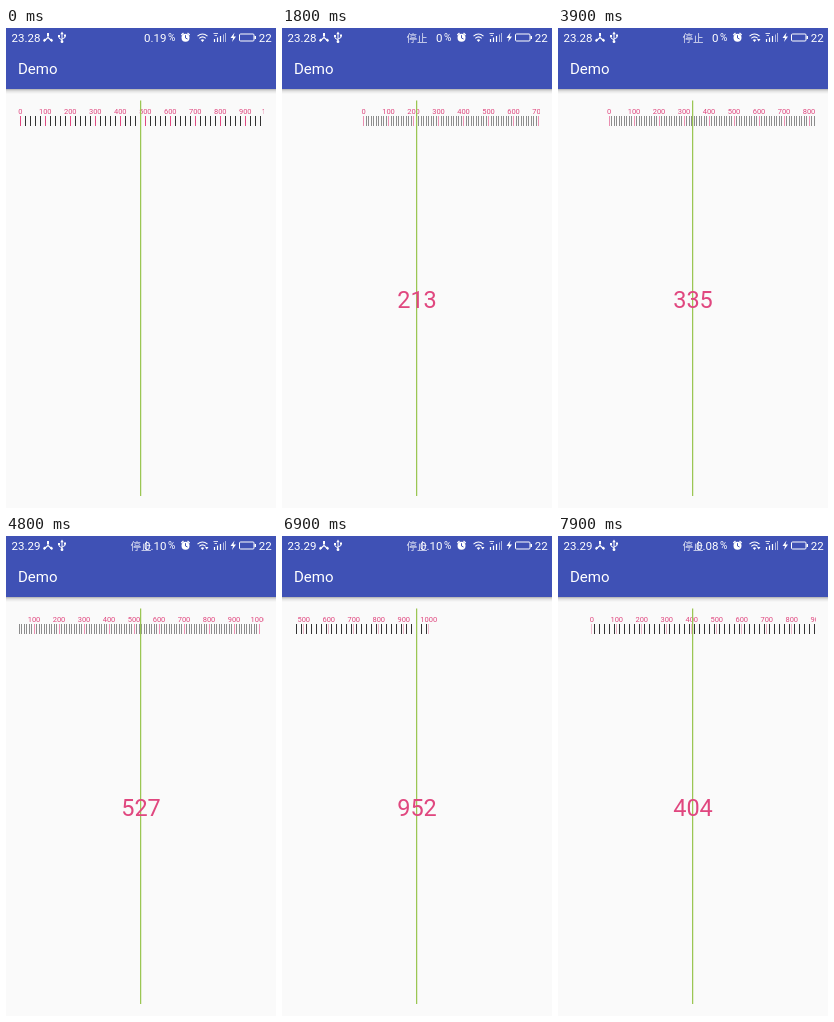
Recreate the animation shown at these times as an HTML page. Size 270 by 480 pixels, loop 8000 ms.

```html
<!DOCTYPE html>
<html lang="en">
<head>
<meta charset="utf-8">
<title>Demo</title>
<style>
  html, body { margin: 0; width: 100%; height: 100%; overflow: hidden; background: #fafafa; }
  svg { display: block; width: 270px; height: 480px; font-family: Roboto, "Noto Sans CJK SC", "Noto Sans CJK", sans-serif; }
  .bar { fill: #fff; font-size: 11.5px; }
  .icon { fill: none; stroke: #fff; }
  .solid { fill: #fff; stroke: none; }
  .pink { fill: #e0477f; text-anchor: middle; }
</style>
</head>
<body>
<svg viewBox="0 0 270 480">
  <defs>
    <linearGradient id="shade" x2="0" y2="1">
      <stop stop-color="#000" stop-opacity=".3"/>
      <stop offset=".4" stop-color="#000" stop-opacity=".1"/>
      <stop offset="1" stop-color="#000" stop-opacity="0"/>
    </linearGradient>
    <clipPath id="view"><rect x="12" y="72" width="246" height="396"/></clipPath>
  </defs>
  <rect width="270" height="480" fill="#fafafa"/>
  <rect y="61" width="270" height="5" fill="url(#shade)"/>
  <rect width="270" height="61" fill="#3f51b5"/>

  <g class="bar">
    <text id="clock" x="5.5" y="13.5"></text>
    <text id="halt" x="124.5" y="13.5" font-size="10.5" opacity=".85">停止</text>
    <text id="speed" x="160.5" y="13.5" text-anchor="end"></text>
    <text x="162" y="13" font-size="10">%</text>
    <text x="252.7" y="13.5">22</text>
    <text x="12" y="45.5" font-size="15">Demo</text>
  </g>

  <g class="icon">
    <path d="M42 5.5V9.5L38 13M42 9.5L46 13" stroke-width="1.1"/>
    <path class="solid" d="M41 5h2v3h-2zM37 12l2-1.5 1 2-2 1.5zM47 12l-2-1.5-1 2 2 1.5z"/>
    <path d="M56 5V14M53 8V10L56 12M59 7.500V9.500L56 11" stroke-width="1"/>
    <path class="solid" d="M56 3.500L57.700 6.300H54.300zM52 7h2v2h-2zM58 6.500h2v2h-2z"/>
    <circle class="solid" cx="56" cy="13.700" r="1.400"/>
    <circle class="solid" cx="179.500" cy="9.700" r="4"/>
    <path d="M175.300 7L177.500 5M183.700 7L181.500 5" stroke-width="1.200"/>
    <path d="M179.500 7.200V10L181.500 11" stroke="#3f51b5"/>
    <path d="M191.500 8.200Q196.500 3.700 201.500 8.200M193.300 10.300Q196.500 7.400 199.700 10.300" stroke-width="1.100"/>
    <path class="solid" d="M194.700 12Q196.500 10.500 198.300 12L196.500 14z"/>
    <path id="traffic" class="solid" d="M199 11h3.500l-1.750 2.500z"/>
    <path d="M208.500 11V14M211.500 9.500V14M214.500 8V14" stroke-width="1.200"/>
    <path d="M217.500 6.500V14M219.500 5V14" stroke-width="1" opacity=".6"/>
    <path d="M207.500 5.500H212M208.500 7.500H211" stroke-width="1" opacity=".8"/>
    <path class="solid" d="M228.500 4.500L224.500 10H227L226 14L230 8.500H227.500z"/>
    <rect x="233.500" y="6" width="14.500" height="7" rx="1"/>
    <path class="solid" d="M248.500 8h1.500v3h-1.500z"/>
  </g>

  <g clip-path="url(#view)">
    <path id="minor" stroke="#333"/>
    <path id="major" stroke="#e0477f"/>
    <g id="labels" class="pink" font-size="7.5"></g>
    <rect x="134" y="72.500" width="1.250" height="396" fill="#9bc653"/>
  </g>
  <text id="value" class="pink" x="135" y="279.800" font-size="23.500"></text>
</svg>
<script>
  const LOOP = 8000, STEP = 100, CENTER = 539;
  const $ = id => document.getElementById(id);

  // Ruler value under the centre line: [ms, value]
  const drag = [
    [0, 482], [500, 395], [900, 395], [1200, 353], [1900, 190], [2300, 190], [2700, 0],
    [3400, 0], [3900, 335], [4100, 390], [4600, 390], [5200, 800], [5600, 800], [5700, 822],
    [6100, 1000], [6800, 1000], [6900, 952], [7400, 480], [7700, 480], [7900, 404], [LOOP, 404]
  ];

  for (let n = 0; n <= 1000; n += 100)
    $('labels').innerHTML += `<text x="${n / 4}" y="85.700">${n}</text>`;

  function valueAt(t) {
    const i = drag.findIndex(k => k[0] > t);
    const [t0, a] = drag[i - 1], [t1, b] = drag[i];
    return Math.round(a + (b - a) * (t - t0) / (t1 - t0));
  }

  // Quarter-scale sampling: even values show every other tick, odd ones show all at half strength.
  function drawTicks(v) {
    let minor = '', major = '';
    for (let n = 0; n <= 1000; n += 10) {
      const x = CENTER - v + n, px = Math.floor(x / 4);
      const mark = `M${px + .5} 88v10`;
      if (n % 100 === 0) major += mark;
      else if (x - px * 4 !== 3) minor += mark;
    }
    const phase = (CENTER - v + 4000) % 4;
    $('minor').setAttribute('d', minor);
    $('major').setAttribute('d', major);
    $('minor').setAttribute('opacity', v % 2 ? .55 : 1);
    $('major').setAttribute('opacity', [.6, 1, .6, .35][phase]);
  }

  function draw(t) {
    const v = valueAt(t);
    drawTicks(v);
    $('labels').setAttribute('transform', `translate(${134.75 - v / 4})`);
    $('value').textContent = t < 100 ? '' : v;
    $('clock').textContent = t < 4700 ? '23.28' : '23.29';
    $('speed').textContent = t < 100 ? '0.19' : t < 4700 ? '0' : t < 7800 ? '0.10' : '0.08';
    $('halt').setAttribute('visibility', t < 100 ? 'hidden' : 'visible');
    $('traffic').setAttribute('visibility', t < 3000 ? 'hidden' : 'visible');
  }

  const start = performance.now();
  function tick() {
    const t = (performance.now() - start) % LOOP;
    draw(Math.floor(t / STEP) * STEP);
    requestAnimationFrame(tick);
  }
  tick();
</script>
</body>
</html>
```
